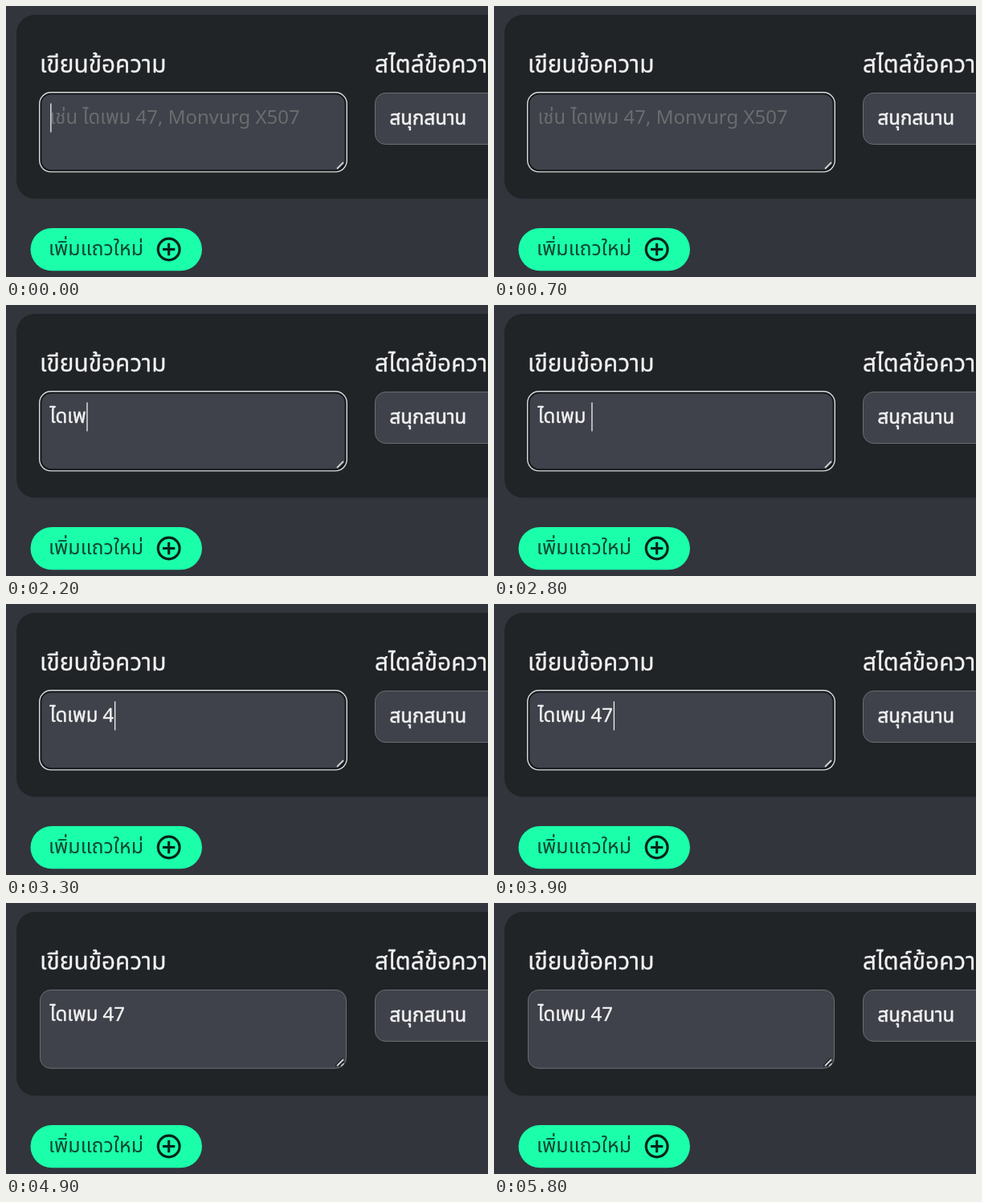
Animation, 600 px wide and 338 px high, one loop 5.9 s. Source, as an HTML page with a canvas:

```html
<!DOCTYPE html>
<html lang="th">
<head>
<meta charset="utf-8">
<title>Message form</title>
<style>
html, body { margin: 0; width: 100%; height: 100%; overflow: hidden; background: #32353c; }
canvas { display: block; width: 600px; height: 338px; }
</style>
</head>
<body>
<canvas id="stage"></canvas>
<script>
const W = 600, H = 338, LOOP = 5900;
const FAMILY = '"Noto Sans", "Noto Sans Thai", "Noto Sans Thai UI", sans-serif';
const MESSAGE = 'ไดเพม 47';
const HINT = 'เช่น ' + MESSAGE + ', Monvurg X507';
const TYPE_START = 1100, TYPE_STEP = 330, BLUR = 4000, BLINK = 500;
const TEXT_X = 54.5;
const LIGHT = '#f1f1f2', DARK = '#15171a', FIELD = '#3f424a', EDGE = '#6c6e72';

const canvas = document.getElementById('stage');
const ctx = canvas.getContext('2d');
const ratio = window.devicePixelRatio || 1;
canvas.width = W * ratio;
canvas.height = H * ratio;
ctx.scale(ratio, ratio);

function box(x, y, right, bottom, radius, fill, stroke) {
  ctx.beginPath();
  ctx.roundRect(x, y, right - x, bottom - y, radius);
  ctx.fillStyle = fill;
  ctx.fill();
  if (stroke) {
    ctx.strokeStyle = stroke;
    ctx.lineWidth = 1;
    ctx.stroke();
  }
}

// A thin outline in the text colour gives the in-between weights.
function label(str, x, y, size, color, outline = 0) {
  ctx.font = `${size}px ${FAMILY}`;
  ctx.fillStyle = color;
  ctx.fillText(str, x, y);
  if (outline) {
    ctx.strokeStyle = color;
    ctx.lineWidth = outline;
    ctx.lineJoin = 'round';
    ctx.strokeText(str, x, y);
  }
  return ctx.measureText(str).width;
}

function line(x1, y1, x2, y2, color, width) {
  ctx.beginPath();
  ctx.moveTo(x1, y1);
  ctx.lineTo(x2, y2);
  ctx.strokeStyle = color;
  ctx.lineWidth = width;
  ctx.stroke();
}

function drawHandle(focused) {
  if (!focused) line(410.5, 203, 419.5, 194, DARK, 2.2);
  line(412, 203, 420, 195, '#d0d1d3', 1.8);
  line(415, 203.5, 420.5, 198, DARK, 1.6);
  if (!focused) line(417, 203.5, 420.5, 200, '#d0d1d3', 1.5);
}

function drawField(t) {
  const focused = t < BLUR;
  if (focused) {
    box(41, 107, 425, 207.6, 15, '#dcddde');
    box(42.4, 108.4, 423.6, 206.2, 13.6, DARK);
    box(44.4, 110.4, 421.6, 204.2, 11.6, FIELD);
  } else {
    box(42.5, 108.5, 423.5, 206.2, 13, FIELD, EDGE);
  }
  drawHandle(focused);

  const count = Math.floor((t - TYPE_START) / TYPE_STEP) + 1;
  const typed = MESSAGE.slice(0, Math.max(0, count));
  let width = 0;
  if (typed) width = label(typed, TEXT_X, 147, 24, LIGHT, 0.4);
  else label(HINT, TEXT_X, 147, 24, '#6b6c6f');

  // The caret restarts its blink with every typed character.
  const last = typed ? TYPE_START + (typed.length - 1) * TYPE_STEP : 0;
  if (focused && Math.floor((t - last) / BLINK) % 2 === 0) {
    ctx.fillStyle = LIGHT;
    ctx.fillRect(TEXT_X + width + 0.7, 121.5, 1.3, 36);
  }
}

function drawButton() {
  const ink = '#04241a';
  box(30.5, 277, 244, 330.2, 26.6, '#1bffaa');
  label('เพิ่มแถวใหม่', 53, 311, 25, '#0d4733');
  ctx.beginPath();
  ctx.arc(202.7, 303.5, 13.4, 0, Math.PI * 2);
  ctx.strokeStyle = ink;
  ctx.lineWidth = 3.2;
  ctx.stroke();
  line(195, 303.5, 210.4, 303.5, ink, 3.1);
  line(202.7, 295.8, 202.7, 311.2, ink, 3.1);
}

function draw(t) {
  ctx.fillStyle = '#32353c';
  ctx.fillRect(0, 0, W, H);
  box(13, 11, 660, 240.5, 23, '#212427');
  label('เขียนข้อความ', 42, 83.3, 29.8, LIGHT, 0.3);
  label('สไตล์ข้อความ', 459, 83.3, 29.8, LIGHT, 0.3);
  box(459.5, 108.5, 680, 172.5, 13, FIELD, EDGE);
  label('สนุกสนาน', 477.6, 148, 24, LIGHT, 0.6);
  drawField(t);
  drawButton();
}

const start = performance.now();
function tick() {
  draw((performance.now() - start) % LOOP);
  requestAnimationFrame(tick);
}
tick();
</script>
</body>
</html>
```
